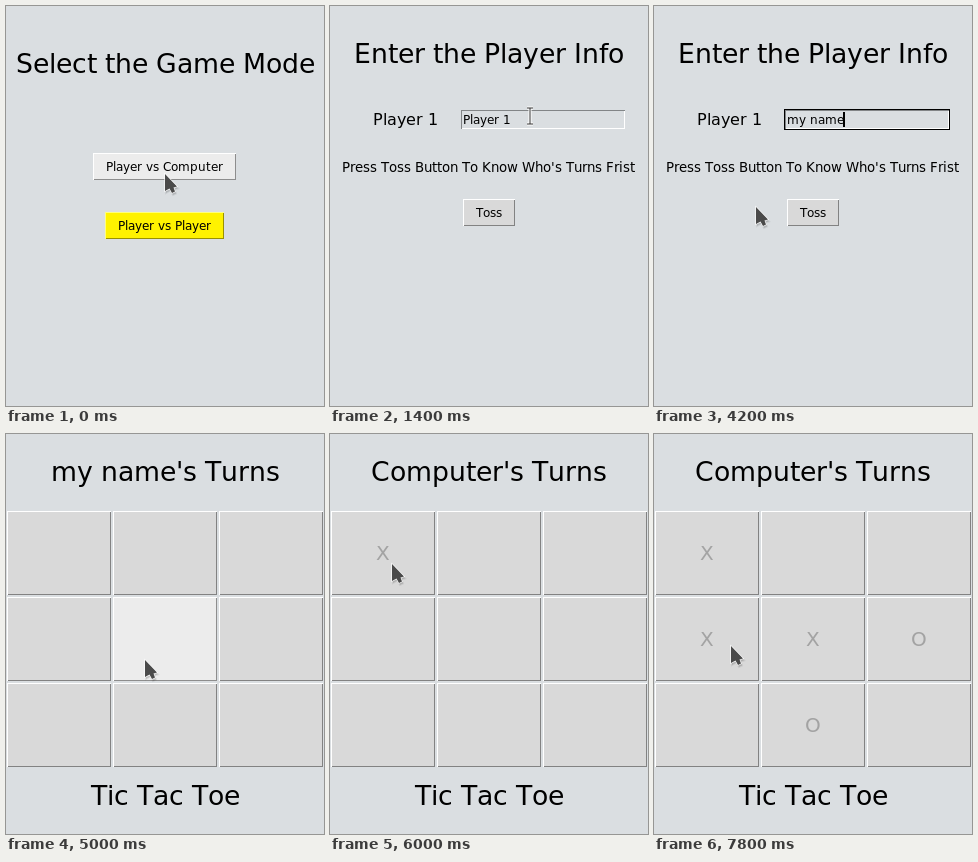
These frames come from a looping animation (318x400 px, 8000 ms). An HTML page:

```html
<!DOCTYPE html>
<html>
<head>
<meta charset="utf-8">
<style>
html, body { margin: 0; width: 100%; height: 100%; overflow: hidden; background: #dadee1 }
svg { display: block; width: 318px; height: 400px; font-family: "DejaVu Sans", sans-serif }
rect { shape-rendering: crispEdges }
</style>
</head>
<body>
<svg id="stage" viewBox="0 0 318 400"></svg>
<script>
const stage = document.getElementById('stage');
const ruler = document.createElement('canvas').getContext('2d');
ruler.font = '100px "DejaVu Sans", sans-serif';

const LOOP = 8000, STEP = 200, BIG = 26.67, MID = 159;
const BACK = [218, 222, 225], FACE = [217, 217, 217], HOVER = [236, 236, 236], YELLOW = [255, 242, 0];

// Pointer stops: arrival and travel time, then the place
const stops = [
  { at: 0, travel: 1, x: 159, y: 168 },
  { at: 1400, travel: 800, x: 200, y: 110 },
  { at: 4200, travel: 200, x: 102, y: 201 },
  { at: 4600, travel: 400, x: 147, y: 208 },
  { at: 5400, travel: 600, x: 117, y: 277 },
  { at: 6000, travel: 600, x: 62, y: 130 },
  { at: 6600, travel: 600, x: 146, y: 204 },
  { at: 7000, travel: 400, x: 140, y: 246 },
  { at: 7800, travel: 200, x: 77, y: 212 }
];
// The player clicks, the computer answers one step later; cells in order of play
const clicks = [6000, 6800, 7800], cells = [0, 5, 4, 7, 3];
const moveTime = i => clicks[i >> 1] + i % 2 * STEP;

const clamp = v => Math.max(0, Math.min(1, v));
const ease = v => v * v * (3 - 2 * v);
const inside = (p, x, y, w, h) => p.x >= x && p.x < x + w && p.y >= y && p.y < y + h;
const rgb = c => `rgb(${c.map(Math.floor)})`;
const light = c => c.map(v => Math.max(Math.min(255, v * 1.4), (255 + v) / 2));
const dark = c => c.map(v => v * 0.6);

function pointerAt(t) {
  let { x, y } = stops[0];
  for (const s of stops) {
    const k = ease(clamp((t - s.at) / s.travel + 1));
    x += (s.x - x) * k;
    y += (s.y - y) * k;
  }
  return { x: Math.round(x), y: Math.round(y) };
}

// Letters advance by whole pixels, without kerning
const advance = (c, size) => Math.round(ruler.measureText(c).width * size / 100);
const textWidth = (s, size) => [...s].reduce((sum, c) => sum + advance(c, size), 0);

function text(s, x, y, size, fill = '#000') {
  const xs = [...s].map(c => { const at = x; x += advance(c, size); return at; });
  return `<text x="${xs.join(' ')}" y="${y}" font-size="${size}" fill="${fill}" xml:space="preserve">${s}</text>`;
}

const centred = (s, mid, y, size, fill) => text(s, Math.round(mid - textWidth(s, size) / 2), y, size, fill);

const rect = (x, y, w, h, fill) => `<rect x="${x}" y="${y}" width="${w}" height="${h}" fill="${fill}"/>`;

function bevel(x, y, w, h, face, sunken) {
  const edges = [rgb(light(face)), rgb(dark(face))];
  if (sunken) edges.reverse();
  return rect(x, y, w, h, edges[0]) + rect(x + 1, y + 1, w - 1, h - 1, edges[1]) +
    rect(x + 1, y + 1, w - 2, h - 2, rgb(face));
}

function button(label, x, y, p, face = FACE) {
  const w = textWidth(label, 12) + 26, h = 27;
  return bevel(x, y, w, h, inside(p, x, y, w, h) ? HOVER : face) + text(label, x + 13, y + 18, 12);
}

function modeScreen(t, p) {
  return centred('Select the Game Mode', MID, 67, BIG) +
    button('Player vs Computer', 87, 147, p) +
    button('Player vs Player', 99, 206, p, YELLOW);
}

function fieldText(t) {
  const erased = clamp((t - 1600) / 1000), typed = clamp((t - 2800) / 1200);
  return typed ? 'my name'.slice(0, Math.round(7 * typed)) : 'Player 1'.slice(0, Math.round(8 * (1 - erased)));
}

function infoScreen(t, p) {
  const name = fieldText(t), focused = t >= 1600;
  return centred('Enter the Player Info', MID, 57, BIG) +
    text('Player 1', 43, 119, 16) +
    (focused ? rect(130, 103, 166, 21, '#000') : '') +
    bevel(131, 104, 164, 19, BACK, true) +
    text(name, 133, 118, 12) +
    (focused ? rect(132 + textWidth(name, 12), 106, 2, 15, '#000') : '') +
    text("Press Toss Button To Know Who's Turns Frist", 12, 166, 13.33) +
    button('Toss', 133, 193, p);
}

function gameScreen(t, p) {
  const played = cells.filter((_, i) => t >= moveTime(i));
  const who = played.length % 2 ? 'Computer' : 'my name';
  let out = centred(who + "'s Turns", MID, 47, BIG) + centred('Tic Tac Toe', MID, 371, BIG);
  for (let i = 0; i < 9; i++) {
    const x = 1 + i % 3 * 106, y = 77 + Math.floor(i / 3) * 86, w = 104, h = 84;
    const turn = played.indexOf(i);
    out += bevel(x, y, w, h, turn < 0 && inside(p, x, y, w, h) ? HOVER : FACE);
    if (turn >= 0) out += centred('XO'[turn % 2], x + w / 2, y + 49, 20, '#a3a3a3');
  }
  return out;
}

function pointer(p, beam) {
  const bar = 'd="M-3-8h6M-3 8h6M0-8V8" fill="none"';
  const arrow = 'd="M0 0V17L4.5 14.5 7 19 10 17.5 8.5 13.5 12 12.5Z"';
  const shape = beam
    ? `<path ${bar} stroke="#fff" stroke-width="3"/><path ${bar} stroke="#333"/>`
    : `<path ${arrow} transform="translate(1 2)" fill="#0002" stroke="#0001" stroke-width="2"/>
       <path ${arrow} fill="#4a4a4a" stroke="#fff" stroke-width="1.2" paint-order="stroke"/>`;
  return `<g transform="translate(${p.x} ${p.y})">${shape}</g>`;
}

function draw(t) {
  const p = pointerAt(t);
  const screen = t < 600 ? modeScreen : t < 4800 ? infoScreen : gameScreen;
  stage.innerHTML = screen(t, p) + pointer(p, t >= 1400 && t < 4200);
}

let shown = -1;
function tick() {
  const t = Math.floor(performance.now() % LOOP / STEP) * STEP;
  if (t !== shown) draw(shown = t);
  requestAnimationFrame(tick);
}
tick();
</script>
</body>
</html>
```
